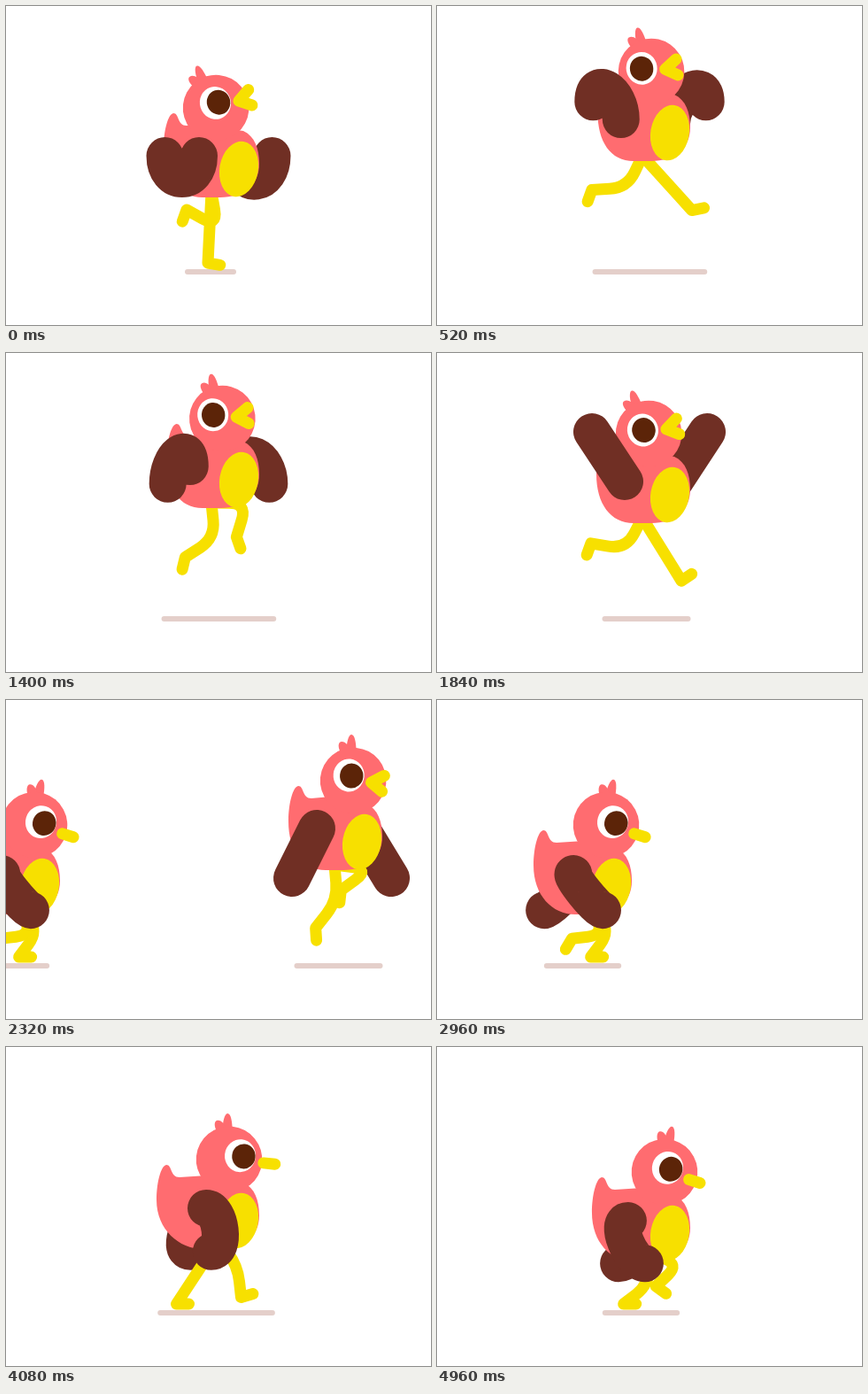
An HTML page that plays this animation: 480x360 px, repeating every 5 s.

```html
<!DOCTYPE html>
<html lang="en">
<head>
<meta charset="utf-8">
<title>Hopping bird</title>
<style>
  html, body { margin: 0; width: 100%; height: 100%; overflow: hidden; background: #fff; }
  svg { display: block; width: 100vw; height: 100vh; }
</style>
</head>
<body>
<svg id="stage" viewBox="0 0 480 360"></svg>
<script>
const LOOP = 5000, STEP = 40, BEAT = 320;
const PINK = '#ff6c70', BROWN = '#702f24', YELLOW = '#f7e000', DARK = '#5c2408', SHADE = '#e4cfca';
const stage = document.getElementById('stage');
const { max, sqrt, hypot, tanh, PI } = Math;

// Waves measured in turns
const cos = turns => Math.cos(turns * 2 * PI);
const sin = turns => Math.sin(turns * 2 * PI);

function set(el, attrs) {
  for (const name in attrs) el.setAttribute(name, attrs[name]);
}

function add(parent, tag, attrs = {}) {
  const el = document.createElementNS('http://www.w3.org/2000/svg', tag);
  set(el, attrs);
  return parent.appendChild(el);
}

function limb(parent, color, width) {
  return add(parent, 'path', {
    fill: 'none', stroke: color, 'stroke-width': width,
    'stroke-linecap': 'round', 'stroke-linejoin': 'round'
  });
}

function makeBird() {
  const root = add(stage, 'g');
  const b = { root };
  b.shadow = limb(root, SHADE, 6);
  b.backWing = limb(root, BROWN, 42);
  b.legs = [limb(root, YELLOW, 13), limb(root, YELLOW, 13)];
  b.body = add(root, 'path', { fill: PINK });
  b.belly = add(root, 'ellipse', { rx: 21.8, ry: 31.5, fill: YELLOW });
  b.head = add(root, 'g');
  add(b.head, 'path', { d: 'M-6-33C-6-43-3-52 0-52C4-52 5-43 5-33Z', fill: PINK, transform: 'rotate(-8)' });
  add(b.head, 'path', { d: 'M-5-33C-7-41-5-46-2-46C3-46 5-40 7-33Z', fill: PINK, transform: 'rotate(-21)' });
  add(b.head, 'circle', { r: 37.3, fill: PINK });
  b.face = add(b.head, 'g');
  add(b.face, 'ellipse', { cy: -5.5, rx: 17.5, ry: 18.5, fill: '#fff' });
  b.pupil = add(b.face, 'ellipse', { cy: -5.2, rx: 13.2, ry: 14, fill: DARK });
  b.beak = limb(b.face, YELLOW, 13);
  b.frontWing = limb(root, BROWN, 42);
  return b;
}

function bodyPath(left, base, headX) {
  const y = v => base + v;
  return `M${left},${y(-55)}C${left},${y(-75)} ${left + 5},${y(-94)} ${left + 11},${y(-95)}` +
    `C${left + 18},${y(-95)} ${left + 15},${y(-81)} ${left + 26},${y(-81)}` +
    `L${headX - 25},${y(-83)}L268,${y(-75)}C281,${y(-69)} 286,${y(-55)} 286,${y(-38)}` +
    `C286,${y(-14)} 268,${y(0)} 242,${y(0)}L222,${y(0)}C196,${y(0)} ${left},${y(-22)} ${left},${y(-55)}Z`;
}

// Two equal bones from hip to ankle, knee forward, then a foot at the given angle
function legPath(hx, hy, bone, { x, y, turn }) {
  const dx = x - hx, dy = y - hy, reach = hypot(dx, dy);
  const out = sqrt(max(0, bone ** 2 - reach ** 2 / 4)) / reach;
  const kx = hx + dx / 2 + dy * out, ky = hy + dy / 2 - dx * out;
  return `M${hx},${hy}L${(hx + kx) / 2},${(hy + ky) / 2}` +
    `Q${kx},${ky} ${(kx + x) / 2},${(ky + y) / 2}L${x},${y}` +
    `l${14 * cos(turn / 360)},${14 * sin(turn / 360)}`;
}

function wingPath(sx, sy, tx, ty, bendX, bendY) {
  return `M${sx},${sy}C${sx + bendX},${sy + bendY} ${tx + bendX},${ty + bendY} ${tx},${ty}`;
}

function draw(b, p) {
  const half = p.shadowW / 2 - 3;
  set(b.root, { transform: `translate(${p.x},0)` });
  set(b.shadow, { d: `M${p.shadowX - half},300H${p.shadowX + half}` });
  set(b.backWing, { d: p.backWing });
  set(b.frontWing, { d: p.frontWing });
  b.legs.forEach((leg, i) => set(leg, { d: p.legs[i] }));
  set(b.body, { d: bodyPath(p.left, p.base, p.headX) });
  set(b.belly, { transform: `translate(263,${p.base - 32})rotate(10)` });
  set(b.head, { transform: `translate(${p.headX},${p.base - 101})rotate(${p.tilt})` });
  set(b.face, { transform: `translate(${p.face},0)` });
  set(b.pupil, { cx: p.look });
  set(b.beak, { d: p.beak });
}

function hopFoot(u, hipX, hipY) {
  return {
    x: hipX - 7 - 50 * sin(u - .062) - 9 * cos(2 * u) - 7 * cos(3 * u),
    y: hipY + 50 + 30 * cos(u),
    turn: 110 - 145 * ((1 - cos(u - .39)) / 2) ** 3
  };
}

function hop(t) {
  const beat = t / BEAT, stride = beat / 2;
  const wave = cos(beat), air = (1 - wave) / 2;
  const sway = -cos(stride + .02);
  const base = 192 + 24 * wave, hipY = base - 6;
  const leg = u => legPath(232, hipY, 40, hopFoot(u, 232, hipY));

  const lift = 56 * sin(beat) ** 3, spread = 4.5 * sin(beat);
  const bend = 36 * tanh(2 * wave);
  const wing = (sx, sy, tx) => wingPath(sx, sy, tx, base - 47 + lift, 0, bend);
  return {
    x: 139 * (max(0, t - 1900) / 420) ** 2,
    base,
    headX: 247 + 10 * sway,
    left: 178 + 4 * air,
    tilt: -3 + 14 * sway,
    face: 1 - 13 * air,
    look: 3.7 - 3 * air * (1 - sway),
    beak: 'M40-9L26,0L39,9',
    legs: [leg(stride), leg(stride + .5)],
    frontWing: wing(212 + 6 * wave, base - 47, 179.5 + spread),
    backWing: wing(265, base - 42, 300.5 - spread),
    shadowX: 231 + 11 * air,
    shadowW: 100 - 42 * wave
  };
}

function walkFoot(u) {
  const swing = max(0, cos(u - .18));
  return {
    x: 229 + 38 * cos(u - .42),
    y: 290 - 22 * swing,
    turn: swing * (40 - 125 * sin(u - .25))
  };
}

function walk(t) {
  const beat = t / BEAT, stride = beat / 2;
  const up = -cos(beat - .375);
  const turn = cos(stride - .38);
  const base = 235 - 10 * up;
  const leg = u => legPath(240, base - 10, 36, walkFoot(u));
  const wing = (u, sx) => {
    const swing = cos(u - .07);
    return wingPath(sx, base - 46, 220 - 35 * swing, base + 4 - 10 * swing ** 2, 18 * sin(u - .07), 0);
  };
  return {
    x: -225 * (max(0, 3500 - t) / 1180) ** 1.57,
    base,
    headX: 254.5 - 3.5 * up,
    left: 172.5 - 3.5 * up,
    tilt: 11.5 - 8 * up,
    face: 6 + 6 * turn,
    look: 4,
    beak: 'M27,0H40',
    legs: [leg(stride), leg(stride + .5)],
    frontWing: wing(stride, 220 + 6 * turn),
    backWing: wing(stride + .5, 228),
    shadowX: 234 + 5 * up,
    shadowW: 110 + 32 * up
  };
}

const hopper = makeBird(), walker = makeBird();
const start = performance.now();

function show(bird, visible, pose, t) {
  bird.root.style.display = visible ? '' : 'none';
  if (visible) draw(bird, pose(t));
}

function frame() {
  const t = Math.floor((performance.now() - start) % LOOP / STEP) * STEP;
  show(hopper, t < 2720, hop, t);
  show(walker, t > 1900, walk, t);
  requestAnimationFrame(frame);
}
frame();
</script>
</body>
</html>
```
